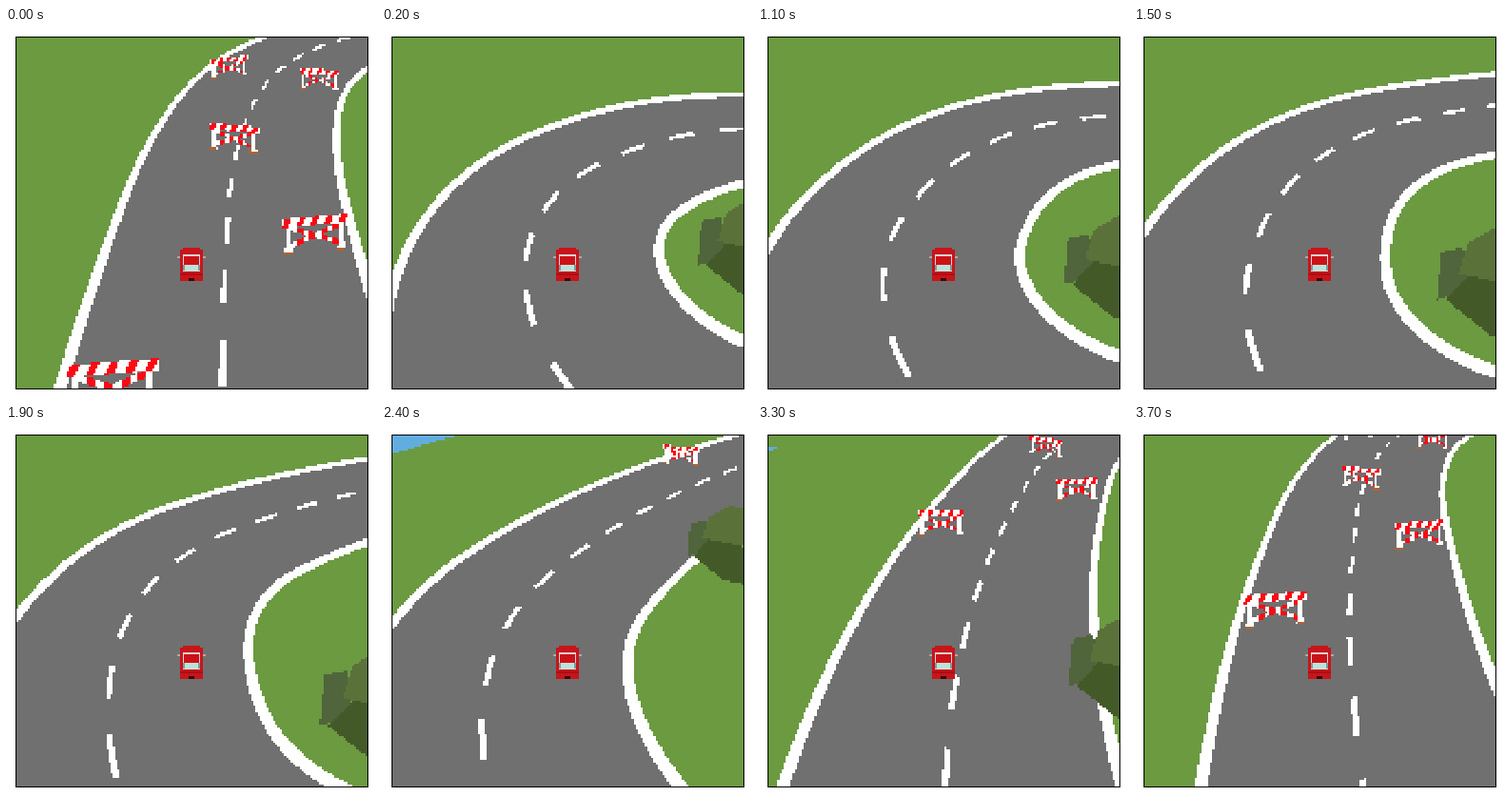
An HTML page with a canvas for the animation above (3800 ms loop, 389 px wide and 389 px high).

```html
<!DOCTYPE html>
<html lang="en">
<head>
<meta charset="utf-8">
<title>Road drive</title>
<style>
html, body { margin: 0; width: 100%; height: 100%; overflow: hidden; background: #fff; }
canvas { display: block; width: 389px; height: 389px; }
</style>
</head>
<body>
<canvas id="view" width="389" height="389"></canvas>
<script>
const ctx = document.getElementById('view').getContext('2d');
const CELLS = 160, LEFT = 11, TOP = 10, SIZE = 369, CELL = SIZE / CELLS;
const low = document.createElement('canvas');
low.width = low.height = CELLS;
const g = low.getContext('2d');

const GRASS = '#6b9a41', ROAD = '#707070', WATER = '#62ade0', WHITE = '#fff', RED = '#fa0a14';
const LOOP = 3800, STEP = 100, LAST = 4100;
const HORIZON = -181, CENTER = 195, DEPTH = 620, CAR_DEPTH = 1.445;
const OUTER = -0.305, INNER = 0.333, DASH = 0.206, RAD = Math.PI / 180;

// The track as arcs: length and turn in degrees.
const ARCS = [[1.7, 158], [0.3, 17], [0.73, 48], [0.57, 11], [0.7, 8], [0.5, 2.5], [0.4, 6.5], [0.3, 5], [0.3, 9], [1.7, 64]];
const ARC_START = -1, ARC_HEADING = -120;

// The drive: time, distance along the track, offset from the middle line, heading.
const DRIVE = [
  [100, 0.17, 0.1, -10],
  [600, 0.289, 0.116, 0],
  [1100, 0.536, 0.145, 21.5],
  [1900, 0.946, 0.192, 51],
  [2400, 1.333, 0.186, 71],
  [2900, 1.755, 0.023, 86.7],
  [3700, 2.692, -0.077, 117.5],
  [LAST, 3.209, -0.083, 118]
];

// Distance, offset and tilt, nearest first.
const BARRIERS = [[2.83, -0.2, -0.08], [3.29, 0.225, -0.11], [3.78, -0.01, 0.05], [4.41, -0.18, -0.18], [4.43, 0.225, -0.05]];
const TREES = [[0.3, 0.526], [2.22, 0.36]];
const LEAVES = [
  ['#50653b', [-0.09, -0.09, -0.04, -0.1, -0.03, 0, -0.1, 0.02]],
  ['#435a28', [-0.08, 0.02, -0.02, -0.045, 0.12, 0, 0.12, 0.12, 0.02, 0.1]],
  ['#5b713a', [-0.03, -0.11, 0.04, -0.15, 0.15, -0.13, 0.15, 0, -0.05, -0.04]]
];

const GRAIN = 0.01, path = [];
{
  let x = 0, v = 0, heading = ARC_HEADING;
  for (const [length, turn] of ARCS) {
    const n = Math.round(length / GRAIN);
    for (let i = 0; i < n; i++) {
      path.push([x, v, heading]);
      const mid = (heading + turn / n / 2) * RAD;
      x += Math.sin(mid) * GRAIN;
      v += Math.cos(mid) * GRAIN;
      heading += turn / n;
    }
  }
}

// World position beside the track.
function trackAt(dist, side) {
  const f = Math.min(Math.max((dist - ARC_START) / GRAIN, 0), path.length - 1.001);
  const i = Math.floor(f);
  const [x, v, heading] = path[i].map((a, c) => a + (path[i + 1][c] - a) * (f - i));
  return [x + side * Math.cos(heading * RAD), v - side * Math.sin(heading * RAD), heading];
}

// Smooth interpolation of rows that start with their time.
function keyed(rows, t) {
  let i = 0;
  while (i < rows.length - 2 && t >= rows[i + 1][0]) i++;
  const span = rows[i + 1][0] - rows[i][0], s = (t - rows[i][0]) / span, u = 1 - s;
  const slope = (k, c) => {
    const a = rows[Math.max(k - 1, 0)], b = rows[Math.min(k + 1, rows.length - 1)];
    return (b[c] - a[c]) / (b[0] - a[0]) * span;
  };
  return rows[i].map((a, c) => a * (1 + 2 * s) * u * u + slope(i, c) * s * u * u
    + rows[i + 1][c] * s * s * (3 - 2 * s) - slope(i + 1, c) * s * s * u);
}

const pairs = flat => flat.reduce((out, v, i) => (i % 2 ? out[out.length - 1].push(v) : out.push([v]), out), []);

// Hard-edged polygon fill on the coarse grid.
function fill(pts, color) {
  if (pts.length < 3) return;
  g.fillStyle = color;
  const ys = pts.map(p => p[1]);
  const from = Math.max(0, Math.floor((Math.min(...ys) - TOP) / CELL));
  const to = Math.min(CELLS - 1, Math.ceil((Math.max(...ys) - TOP) / CELL));
  for (let row = from; row <= to; row++) {
    const y = TOP + (row + 0.5) * CELL, hits = [];
    pts.forEach((a, i) => {
      const b = pts[(i + 1) % pts.length];
      if (a[1] <= y !== b[1] <= y) hits.push(a[0] + (b[0] - a[0]) * (y - a[1]) / (b[1] - a[1]));
    });
    hits.sort((a, b) => a - b);
    for (let i = 0; i + 1 < hits.length; i += 2) {
      const [l, r] = [hits[i], hits[i + 1]].map(x => Math.ceil((x - LEFT) / CELL - 0.5));
      if (r > l) g.fillRect(l, row, r - l, 1);
    }
  }
}

// White band whose width shrinks towards the horizon.
function strip(pts, width) {
  const one = [], two = [];
  pts.forEach(([x, y], i) => {
    const a = pts[Math.max(i - 1, 0)], b = pts[Math.min(i + 1, pts.length - 1)];
    const dx = b[0] - a[0], dy = b[1] - a[1];
    const k = width * (y - HORIZON) / 2 / (Math.hypot(dx, dy) || 1);
    one.push([x - dy * k, y + dx * k]);
    two.unshift([x + dy * k, y - dx * k]);
  });
  fill([...one, ...two], WHITE);
}

// Camera that follows the car: maps track coordinates to the stage.
function camera(dist, side, heading) {
  const [cx, cv] = trackAt(dist, side);
  const sin = Math.sin(heading * RAD), cos = Math.cos(heading * RAD);
  const see = (d, s) => {
    const [x, v, h] = trackAt(d, s), dx = x - cx, dv = v - cv;
    const depth = dx * sin + dv * cos + CAR_DEPTH;
    if (depth < 0.4) return null;
    return [CENTER + (dx * cos - dv * sin) * DEPTH / depth, HORIZON + DEPTH / depth, h - heading];
  };
  const line = (from, to, s, step = 0.03) => {
    const out = [];
    for (let d = from; d < to + step / 2; d += step) out.push(see(d, s));
    return out.filter(Boolean);
  };
  return { dist, see, line };
}

function road({ dist, line }) {
  const from = dist - 0.8, to = dist + 2.6;
  const l = line(from, to, OUTER), r = line(from, to, INNER);
  fill([...l, ...r.slice().reverse()], ROAD);
  for (let k = Math.floor(from / DASH); k * DASH < to; k++)
    strip(line(k * DASH, (k + 0.51) * DASH, 0, DASH * 0.17), 0.0138);
  strip(l, 0.024);
  strip(r, 0.026);
}

function barrier([x, y, heading], twist) {
  const w = 0.17 * (y - HORIZON), tilt = twist + 0.2 * Math.sin(heading * RAD);
  const shape = (flat, color) =>
    fill(pairs(flat).map(([a, b]) => [x + a * w, y + (a * tilt - b) * w]), color);
  for (const a of [-0.4, 0.4]) {
    shape([a - 0.08, -0.03, a + 0.06, -0.03, a + 0.06, 0.02, a - 0.08, 0.02], '#b5622f');
    shape([a - 0.07, 0, a + 0.08, 0, a + 0.035, 0.08, a + 0.035, 0.4, a - 0.04, 0.4, a - 0.04, 0.08], WHITE);
  }
  for (const d of [1, -1])
    for (let i = 0; i < 8; i++) {
      const a = -0.36 + i * 0.09, b = 0.22 + d * a * 0.36, c = b + d * 0.0324;
      shape([a, b - 0.04, a + 0.09, c - 0.04, a + 0.09, c + 0.04, a, b + 0.04], i % 2 ? RED : WHITE);
    }
  shape([-0.5, 0.37, 0.5, 0.37, 0.5, 0.5, -0.5, 0.5], WHITE);
  for (let i = 0; i < 5; i++) {
    const a = -0.5 + i * 0.21;
    shape([a, 0.37, a + 0.09, 0.37, a + 0.15, 0.5, a + 0.06, 0.5], RED);
  }
}

function tree([x, y]) {
  const k = y - HORIZON;
  for (const [color, face] of LEAVES)
    fill(pairs(face).map(([a, b]) => [x + a * k, y + b * k]), color);
}

function car() {
  const box = (color, x, y, w, h) => { ctx.fillStyle = color; ctx.fillRect(x, y, w, h); };
  box('#b9a5a5', 180, 240, 30, 2);
  box('#c8141b', 186, 231, 18, 2);
  box('#c8141b', 183, 233, 24, 33);
  box('#a90f16', 183, 258, 24, 2);
  box('#e6d2d0', 186, 238, 18, 18);
  box('#cb1219', 187, 240, 16, 9);
  box('#b4e6dc', 188, 250, 14, 5);
  box('#7d9c96', 186, 249, 2, 6);
  box('#7d9c96', 202, 249, 2, 6);
  box('#3a0a0c', 192, 263, 6, 3);
}

function draw(now) {
  const t = Math.floor(now % LOOP / STEP) * STEP;
  // The loop opens on the last moment of the drive, then cuts to its start.
  const [, dist, side, heading] = keyed(DRIVE, t < STEP ? LAST : t);
  const cam = camera(dist, side, heading);

  g.fillStyle = GRASS;
  g.fillRect(0, 0, CELLS, CELLS);
  fill([...cam.line(1.9, 3.4, -1.31), ...cam.line(1.9, 3.4, -3).reverse()], WATER);
  road(cam);
  for (const [d, s, twist] of BARRIERS.slice().reverse()) {
    const spot = cam.see(d, s);
    if (spot) barrier(spot, twist);
  }
  for (const [d, s] of TREES) {
    const spot = cam.see(d, s);
    if (spot) tree(spot);
  }

  ctx.fillStyle = '#fff';
  ctx.fillRect(0, 0, 389, 389);
  ctx.imageSmoothingEnabled = false;
  ctx.drawImage(low, LEFT, TOP, SIZE, SIZE);
  car();
  ctx.strokeStyle = '#000';
  ctx.lineWidth = 1;
  ctx.strokeRect(10.5, 9.5, 370, 370);
}

let begin;
function tick(now) {
  begin ??= now;
  draw(now - begin);
  requestAnimationFrame(tick);
}
draw(0);
requestAnimationFrame(tick);
</script>
</body>
</html>
```
